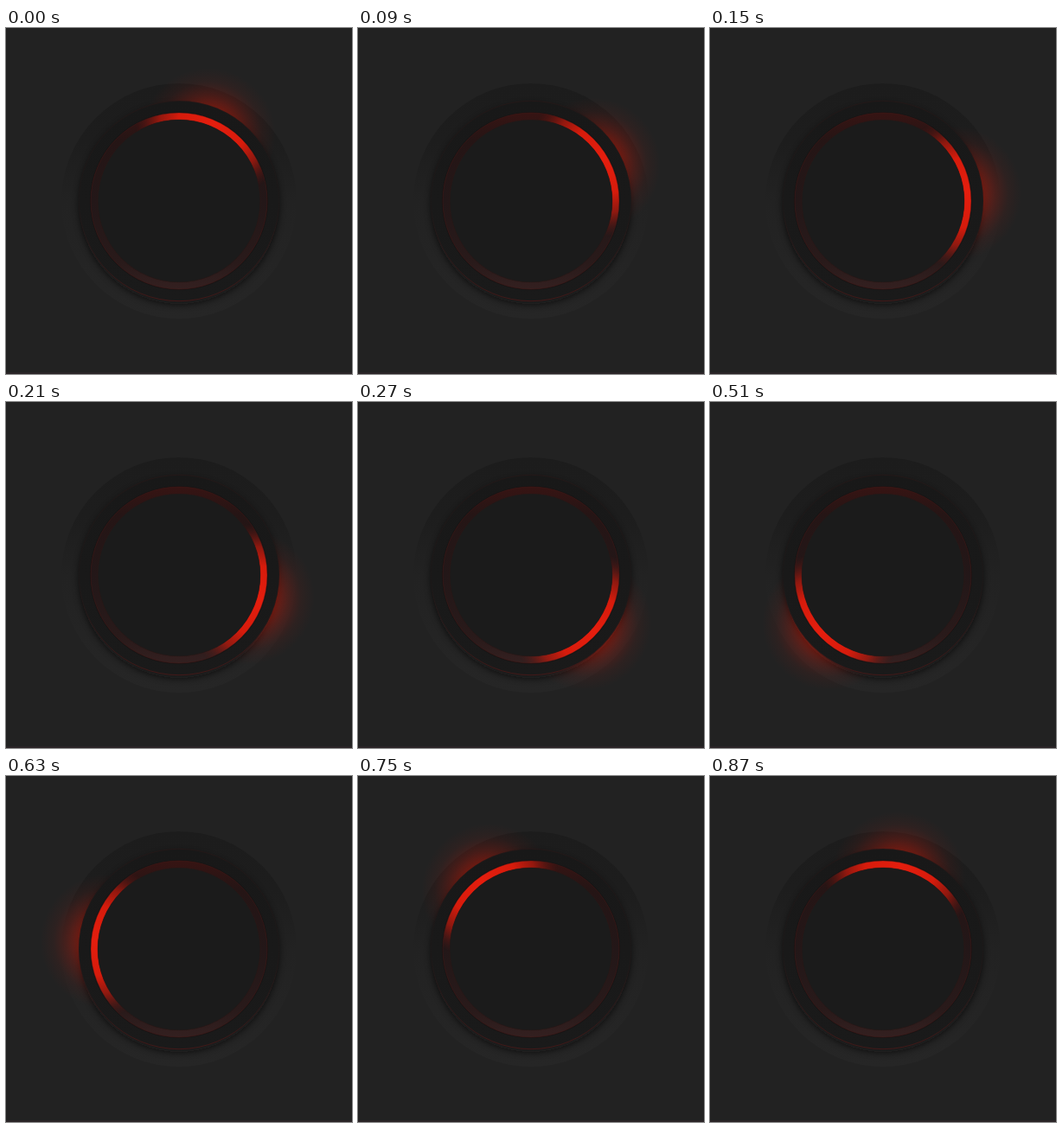
Write an HTML page that moves like this. It is 400 by 400 pixels and loops after 0.9 s.

```html
<!DOCTYPE html>
<html lang="en">
<head>
<meta charset="utf-8">
<title>Glow ring</title>
<style>
  html, body { margin: 0; width: 100%; height: 100%; overflow: hidden; background: #222; }
  svg { display: block; width: 100vw; height: 100vh; }
</style>
</head>
<body>
<svg viewBox="0 0 400 400">
  <defs>
    <linearGradient id="plate" x1="0" y1="0" x2="0" y2="1">
      <stop offset="0" stop-color="#1c1c1c"/>
      <stop offset=".25" stop-color="#1d1d1d"/>
      <stop offset=".5" stop-color="#222"/>
      <stop offset="1" stop-color="#262626"/>
    </linearGradient>
    <linearGradient id="band" x1="0" y1="0" x2="0" y2="1">
      <stop offset="0" stop-color="#181818"/>
      <stop offset="1" stop-color="#1a1a1a"/>
    </linearGradient>
    <linearGradient id="groove" gradientUnits="userSpaceOnUse" x1="0" y1="98" x2="0" y2="302">
      <stop offset="0" stop-color="#371413"/>
      <stop offset=".16" stop-color="#251515"/>
      <stop offset=".5" stop-color="#231718"/>
      <stop offset=".85" stop-color="#291a1a"/>
      <stop offset="1" stop-color="#342020"/>
    </linearGradient>
    <linearGradient id="rim" gradientUnits="userSpaceOnUse" x1="0" y1="84" x2="0" y2="316">
      <stop offset="0" stop-color="#3a1716" stop-opacity=".4"/>
      <stop offset=".5" stop-color="#301616" stop-opacity=".15"/>
      <stop offset="1" stop-color="#5a1817" stop-opacity=".8"/>
    </linearGradient>
    <radialGradient id="halo">
      <stop offset="0" stop-color="#c81a08" stop-opacity=".75"/>
      <stop offset=".42" stop-color="#c81a08" stop-opacity=".48"/>
      <stop offset=".6" stop-color="#b81a0c" stop-opacity=".27"/>
      <stop offset=".8" stop-color="#a01a10" stop-opacity=".09"/>
      <stop offset="1" stop-color="#901a10" stop-opacity="0"/>
    </radialGradient>
    <radialGradient id="light">
      <stop offset="0" stop-color="#e51e0e"/>
      <stop offset=".45" stop-color="#dc1c0c" stop-opacity=".97"/>
      <stop offset=".7" stop-color="#c81a0c" stop-opacity=".65"/>
      <stop offset=".88" stop-color="#a0180e" stop-opacity=".22"/>
      <stop offset="1" stop-color="#801610" stop-opacity="0"/>
    </radialGradient>
    <filter id="soft" x="-20%" y="-20%" width="140%" height="140%">
      <feGaussianBlur stdDeviation="4"/>
    </filter>
    <mask id="slot" maskUnits="userSpaceOnUse" x="0" y="0" width="400" height="400">
      <circle cx="200" cy="200" r="98" fill="none" stroke="#fff" stroke-width="8"/>
    </mask>
  </defs>

  <rect width="400" height="400" fill="#222"/>
  <rect y="398" width="400" height="2" fill="#2a2427"/>
  <circle cx="200" cy="200" r="136" fill="url(#plate)"/>
  <circle cx="200" cy="204" r="115" fill="#0c0c0c" opacity=".75" filter="url(#soft)"/>
  <g class="spin"><circle cx="200" cy="117" r="78" fill="url(#halo)"/></g>

  <circle cx="200" cy="200" r="116" fill="url(#band)"/>
  <circle cx="200" cy="200" r="115.7" fill="none" stroke="url(#rim)" stroke-width=".8"/>
  <circle cx="200" cy="200" r="103" fill="#151414"/>
  <circle cx="200" cy="200" r="98" fill="none" stroke="url(#groove)" stroke-width="8"/>
  <g mask="url(#slot)">
    <g class="spin"><circle cx="200" cy="102" r="90" fill="url(#light)"/></g>
  </g>
  <circle cx="200" cy="200" r="102" fill="none" stroke="#4c1917" stroke-width=".7" opacity=".65"/>
  <circle cx="200" cy="200" r="94" fill="#1b1b1b"/>
  <circle cx="200" cy="200" r="94" fill="none" stroke="#351817" stroke-width=".6" opacity=".7"/>
</svg>
<script>
  const LOOP = 900, STEP = 30, START = 24;
  const spinners = document.querySelectorAll('.spin');

  function draw(time) {
    const step = Math.floor((time % LOOP) / STEP);
    const angle = START + step * 360 * STEP / LOOP;
    for (const g of spinners) g.setAttribute('transform', `rotate(${angle} 200 200)`);
  }

  let begin;
  function tick(now) {
    begin ??= now;
    draw(now - begin);
    requestAnimationFrame(tick);
  }

  draw(0);
  requestAnimationFrame(tick);
</script>
</body>
</html>
```
